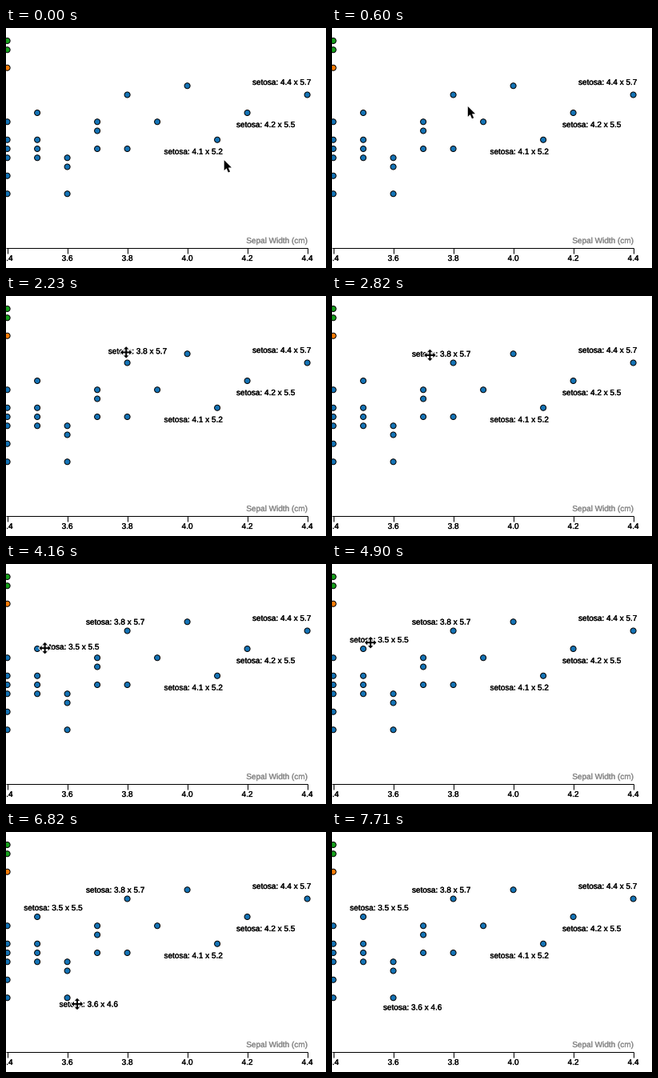
Animation of 400x300 px, one loop 7850 ms. Source, as a matplotlib script:

```python
import numpy as np
import matplotlib.pyplot as plt
from matplotlib.animation import FuncAnimation
from matplotlib.patches import Circle, Polygon
from matplotlib.patheffects import withStroke

W, H, DPI = 400, 300, 100
PX = 72 / DPI
LOOP, INTERVAL, STEPS = 7850, 50, 53

plt.rcParams.update({"font.family": "Liberation Sans", "text.hinting": "none"})

BLUE, GREEN, ORANGE = "#1473b5", "#16a01c", "#fb7d07"
SETOSA = {
    3.4: [5.4, 5.2, 5.1, 5.0, 4.8, 4.6],
    3.5: [5.5, 5.2, 5.1, 5.0],
    3.6: [5.0, 4.9, 4.6],
    3.7: [5.4, 5.3, 5.1],
    3.8: [5.7, 5.1],
    3.9: [5.4], 4.0: [5.8], 4.1: [5.2], 4.2: [5.5], 4.4: [5.7],
}


def place(width, length):
    """Stage position of a flower's measurements."""
    return np.array([1.6 + (width - 3.4) * 375, 83.5 + (5.7 - length) * 112.5])


fig = plt.figure(figsize=(W / DPI, H / DPI), dpi=DPI, facecolor="white")
ax = fig.add_axes([0, 0, 1, 1])
ax.set_xlim(0, W)
ax.set_ylim(H, 0)
ax.axis("off")


def text(x, y, s, color="black", ha="left"):
    # A hairline outline gives the slightly heavy screen lettering.
    weight = withStroke(linewidth=0.3 * PX, foreground=color)
    return ax.text(x, y, s, fontsize=10 * PX, color=color, ha=ha,
                   va="baseline", zorder=5, path_effects=[weight])


def label(width, length, x, y):
    return text(x, y, f"setosa: {width} x {length}")


def line(xs, ys):
    ax.plot(xs, ys, color="black", lw=PX, solid_capstyle="butt")


def dot(width, length, color):
    ax.add_patch(Circle(place(width, length), 3.5, facecolor=color,
                        edgecolor="black", linewidth=PX, zorder=3))


# Horizontal axis
line([0, 377], [275, 275])
for value in np.arange(3.4, 4.5, 0.2):
    tick = place(value, 0)[0]
    line([tick, tick], [275, 282])
    text(tick, 291, f"{value:.1f}", ha="center")
text(377, 269, "Sepal Width (cm)", color="#8c8c8c", ha="right")

for width, lengths in SETOSA.items():
    for length in lengths:
        dot(width, length, BLUE)
for length, color in [(6.3, GREEN), (6.2, GREEN), (6.0, ORANGE)]:
    dot(3.4, length, color)

label(4.4, 5.7, 308, 71)
label(4.2, 5.5, 288, 124)
label(4.1, 5.2, 197.5, 157.7)


def ease_out(t):
    return 1 - (1 - t) ** 2


def smooth(t):
    return t * t * (3 - 2 * t)


class Pointer:
    """Glides through a chain of eased moves."""

    def __init__(self, start):
        self.start = np.array(start, float)
        self.moves = []

    def move(self, begin, end, target, ease, arc=0.0):
        self.moves.append((begin, end, np.array(target, float), ease, arc))

    def at(self, step):
        pos = self.start
        for begin, end, target, ease, arc in self.moves:
            t = np.clip((step - begin) / (end - begin), 0, 1)
            lift = arc * abs(target[0] - pos[0]) * np.sin(np.pi * t)
            pos = pos + (target - pos) * ease(t) - (0, lift)
        return pos


class DraggedLabel:
    """Appears beside its dot, then follows the pointer while dragged."""

    def __init__(self, flower, hover, grip, final, times):
        depart, arrive, self.appear, self.leave, self.grab, self.drop, \
            self.release = times
        self.home = place(*flower) + (4, 0.8)
        self.artist = label(*flower, *self.home)
        pointer.move(depart, arrive, hover, ease_out)
        pointer.move(self.leave, self.grab, grip, smooth)
        pointer.move(self.grab, self.drop, grip + (final - self.home),
                     smooth, arc=0.14)

    def holds_pointer(self, step):
        return self.leave < step <= self.release

    def update(self, step):
        held = pointer.at(np.clip(step, self.grab, self.drop))
        self.artist.set_position(self.home + held - pointer.at(self.grab))
        self.artist.set_visible(step >= self.appear)


pointer = Pointer((272, 164.5))
labels = [
    DraggedLabel((3.8, 5.7), (149.5, 84.5), (178, 82.5), (100, 75.7),
                 times=(1, 6, 10, 10, 13, 17, 19)),
    DraggedLabel((3.5, 5.5), (41.5, 104.5), (69, 107), (22.3, 98),
                 times=(19, 23, 25, 27, 30, 33, 33)),
    DraggedLabel((3.6, 4.6), (78.5, 208), (103, 204.5), (64, 222.4),
                 times=(33, 37, 39, 41, 43, 47, 48)),
]
pointer.move(48, 52, (420, 315), ease_out)

ARROW = 0.7 + 0.92 * np.array([(0, 0), (0, 14), (3.2, 11), (5.6, 16.6),
                               (8, 15.6), (5.6, 10.2), (10, 10)])
ARM = np.array([(-1, -1), (-1, -4), (-3.2, -4), (0, -7.2), (3.2, -4), (1, -4)])
TURN = np.array([(0, 1), (-1, 0)])
CROSS = np.vstack([ARM @ np.linalg.matrix_power(TURN, k) for k in range(4)])

cursor = ax.add_patch(Polygon(
    ARROW, closed=True, facecolor="black", linewidth=0, joinstyle="round",
    zorder=10, path_effects=[withStroke(linewidth=2 * PX, foreground="white")]))


def update(frame):
    # The picture advances in uniform steps of about 148 ms.
    step = min(int((frame * INTERVAL + 40) * STEPS / LOOP), STEPS - 1)
    dragging = any(item.holds_pointer(step) for item in labels)
    cursor.set_xy((CROSS if dragging else ARROW) + pointer.at(step))
    for item in labels:
        item.update(step)
    return [cursor] + [item.artist for item in labels]


anim = FuncAnimation(fig, update, frames=LOOP // INTERVAL, interval=INTERVAL,
                     repeat=True, repeat_delay=0)
plt.show()
```
